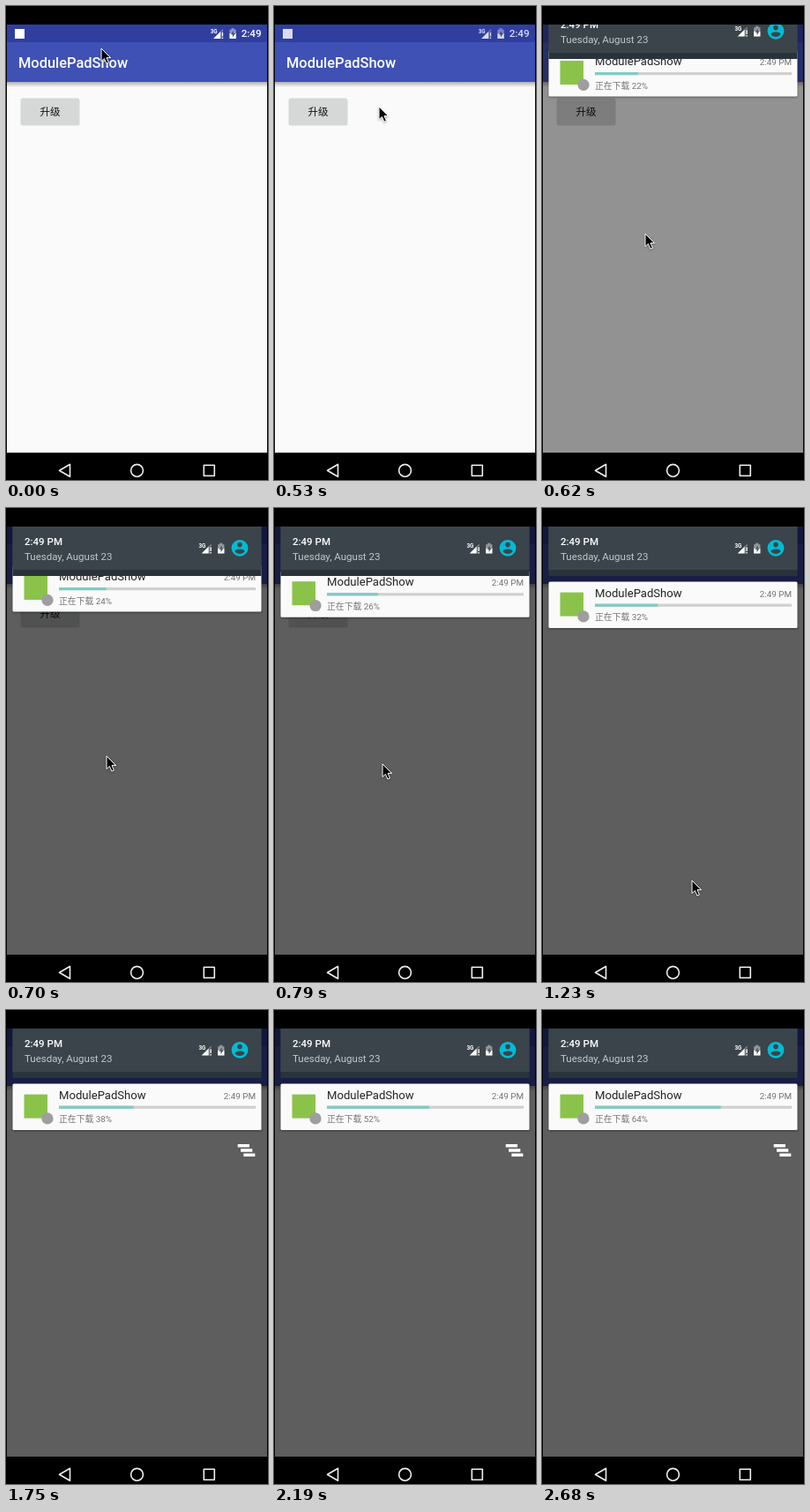
Animation of 297x537 px, one loop 2.79 s. Source, as an HTML page:

```html
<!DOCTYPE html>
<html lang="zh-CN">
<head>
<meta charset="utf-8">
<style>
  html, body { margin: 0; width: 100%; height: 100%; overflow: hidden; background: #000; }
  svg { display: block; width: 297px; height: 537px; font-family: Roboto, "Noto Sans CJK SC", "Noto Sans CJK", sans-serif; }
  .medium { font-weight: 500; }
  .end { text-anchor: end; }
  #card { filter: drop-shadow(0 1px 1px #0006); }
  #cursor { filter: drop-shadow(.5px 1px 1px #0005); }
</style>
</head>
<body>
<svg viewBox="0 0 297 537">
  <defs>
    <linearGradient id="shadow" x2="0" y2="1">
      <stop stop-color="#000" stop-opacity=".3"/>
      <stop offset="1" stop-color="#000" stop-opacity="0"/>
    </linearGradient>
    <!-- signal strength and battery, origin at the left of the network label -->
    <g id="signals" fill="#fff">
      <text x="-.3" y="4.8" font-size="6.3" font-weight="700">3G</text>
      <path d="M3 11.2L11 3.2V11.2Z"/>
      <path d="M11 3.2L14 .2V3H12V11.2H11Z" opacity=".4"/>
      <path d="M12.7 4h1.4v4.7h-1.4zM12.7 9.8h1.4v1.4h-1.4z"/>
      <path d="M21.5 1h2V-.4h3.2V1h2V11.2h-7.2Z" opacity=".45"/>
      <path d="M21.5 5.5h7.2v5.7h-7.2z"/>
      <path d="M26 2.2L22.8 6.6h2V9.7L28 5.3h-2Z" fill="#4a5260"/>
    </g>
  </defs>

  <rect width="297" height="537"/>
  <rect x="1" y="21" width="295" height="485" fill="#fafafa"/>
  <rect x="1" y="86" width="295" height="6" fill="url(#shadow)"/>
  <rect x="1" y="41" width="295" height="45" fill="#3f51b5"/>
  <rect x="1" y="21" width="295" height="20" fill="#303f9f"/>
  <g id="status">
    <rect x="10" y="26" width="11" height="11" fill="#fff"/>
    <use href="#signals" x="232" y="25.7"/>
    <text class="medium end" x="289.5" y="35.3" font-size="11.6" fill="#fff">2:49</text>
  </g>
  <text class="medium" x="14" y="70" font-size="16.4" fill="#fff">ModulePadShow</text>
  <rect x="16.5" y="105" width="67" height="30.5" rx="2" fill="#0002"/>
  <rect x="17" y="104.5" width="66" height="30" rx="1.5" fill="#d6d7d7"/>
  <text class="medium" x="50" y="124.2" font-size="11.5" text-anchor="middle" fill="#111">升级</text>

  <g id="panel">
    <rect id="shade" x="1" y="21" width="295" height="485"/>
    <g id="card">
      <rect x="7.5" width="282" height="52.5" rx="1.5" fill="#fafafa"/>
      <rect x="20.5" y="12" width="26.5" height="27" fill="#8bc34a"/>
      <circle cx="47" cy="39.3" r="6.6" fill="#9e9e9e"/>
      <text x="60" y="17.3" font-size="13.1" fill="#212121">ModulePadShow</text>
      <text class="end" x="283" y="17.2" font-size="9.84" fill="#737373">2:49 PM</text>
      <rect x="60" y="25" width="223" height="3.2" fill="#d0d0d0"/>
      <rect id="bar" x="60" y="25" height="3.2" fill="#80cbc4"/>
      <text id="label" x="60" y="43.6" font-size="9.84" fill="#737373"></text>
    </g>
    <g id="header">
      <rect x="7.5" y="21" width="282" height="56" fill="#29343a"/>
      <rect x="7.5" y="21" width="282" height="49" fill="#3a444a"/>
      <text class="medium" x="21" y="42.3" font-size="11.5" fill="#fff">2:49 PM</text>
      <text x="21" y="59" font-size="11.5" fill="#c4c7c9">Tuesday, August 23</text>
      <use href="#signals" x="218.7" y="40.2"/>
      <g transform="translate(265 45.3)">
        <circle r="9.4" fill="#00bcd4"/>
        <path d="M-5.6 3.7C-5.5 .2 5.5 .2 5.6 3.7A6.8 6.8 0 0 1 -5.6 3.7Z" fill="#3a444a"/>
        <circle cy="-3.7" r="2.8" fill="#3a444a"/>
      </g>
    </g>
    <path id="clear" d="M262.7 152h13.3v3.5h-13.3zM266 157.2h13.3v3.5h-13.3zM269.3 162.4h13v3.5h-13z" fill="#fff"/>
  </g>

  <rect width="297" height="21"/>
  <g fill="none" stroke="#eee" stroke-width="1.6" stroke-linejoin="round">
    <path d="M60.5 526.3L72.5 519.3V533.3Z"/>
    <circle cx="148.5" cy="526.3" r="6.9"/>
    <rect x="224.3" y="520.3" width="12" height="12"/>
  </g>
  <path id="cursor" d="M0 0V14.6L3.4 11.5L5.9 17.2L8.4 16.1L6 10.6H10.6Z" stroke="#fff" stroke-linejoin="round"/>
</svg>

<script>
const LOOP = 2790;
const BEAT = 87.5; // the picture advances in steps of this many ms

const el = id => document.getElementById(id);
const set = (id, name, value) => el(id).setAttribute(name, value);
const move = (id, x, y) => set(id, 'transform', `translate(${x} ${y})`);
const show = (id, on) => set(id, 'visibility', on ? 'visible' : 'hidden');
const smooth = u => u * u * (3 - 2 * u);

function draw(time) {
  const beat = Math.floor(time / BEAT);
  const ramp = (from, to) => Math.min(1, Math.max(0, (beat - from) / (to - from)));

  // The pointer rises to the status bar, pulls the panel down, then leaves.
  const settle = ramp(8, 11), leave = ramp(11, 15);
  const x = 108 + 11 * ramp(0, 6) - 5 * ramp(6, 8) + 26 * settle + 40 * leave;
  const y = 48 - 18 * ramp(0, 4) + 251 * smooth(ramp(5.09, 7.44)) + 28 * settle + 200 * leave ** 2;
  move('cursor', Math.round(x), Math.round(y));
  show('cursor', beat < 16);

  const open = ramp(7, 8);
  set('status', 'opacity', beat < 6 ? 1 : .82);
  show('panel', beat >= 7);
  set('shade', 'opacity', .42 + .205 * open);
  move('header', 0, 17 * open - 17);
  move('card', 0, 50 + 15 * open + 18.6 * settle);
  set('clear', 'opacity', ramp(17, 19));

  const percent = Math.round(22 + 16 * ramp(7, 20) ** .8 + 22 * ramp(20, 28) + 4 * ramp(29, 30));
  set('bar', 'width', 2.23 * percent);
  el('label').textContent = `正在下载 ${percent}%`;
}

const start = performance.now();
function frame() {
  draw((performance.now() - start) % LOOP);
  requestAnimationFrame(frame);
}
frame();
</script>
</body>
</html>
```
